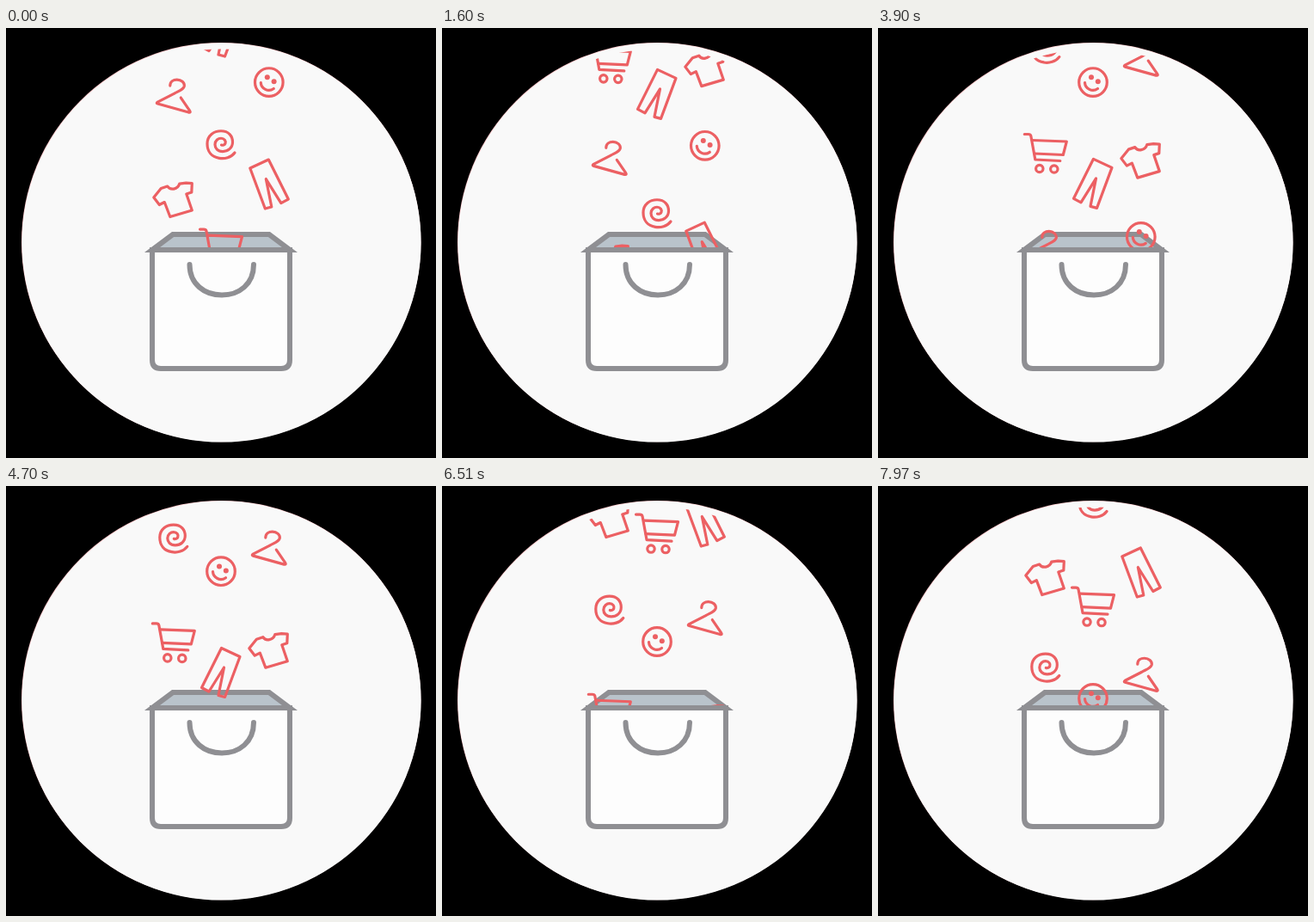
Animation of 500x500 px, one loop 8 s. Source, as an HTML page:

```html
<!DOCTYPE html>
<html lang="en">
<head>
<meta charset="utf-8">
<title>Shopping bag</title>
<style>
  html, body { margin: 0; width: 100%; height: 100%; overflow: hidden; background: #000; }
  svg { display: block; width: 100%; height: 100%; }
  .line { fill: none; stroke: #ec6063; stroke-width: 3.2; stroke-linecap: round; stroke-linejoin: round; }
  .dot { fill: #ec6063; stroke: none; }
  .bag { stroke: #8f8f93; stroke-width: 6; }
</style>
</head>
<body>
<svg viewBox="0 0 500 500">
  <defs>
    <clipPath id="opening">
      <path d="M25.5 255.5V249.5A225 225 0 0 1 475.5 249.5V255.5Z"/>
    </clipPath>
    <g id="smile">
      <circle r="16.3"/>
      <path d="M-9.5 .5C-9 7.5 -1 12 5.5 7.5"/>
      <circle class="dot" cx="-2" cy="-5.8" r="3"/>
      <circle class="dot" cx="5.8" cy="-.8" r="3"/>
    </g>
    <path id="spiral" d="M16 9.5C12 15 4 17 -2 15.8C-11 14.5 -16 8 -16 -1C-16 -11 -8 -15.8 0 -15.8C9 -15.8 13.5 -10 13.5 -3C13.5 4 8 8 2 8C-4 8 -7 4 -7 0C-7 -5 -3 -7.3 0 -7.3C4 -7.3 6 -4 5 -1.5C4.3 .3 2 1 .5 .5"/>
    <g id="hanger">
      <path d="M-4 -12C-4 -17 0 -19 4 -19C9 -19 13 -15.500 12.500 -11.500C11.500 -7 5 -5.500 1 -3L-18.500 7Q-20.500 8.500 -18.500 9L17.500 19Q20.500 19.500 18.800 17L8.500 2"/>
    </g>
    <path id="shirt" d="M-23 -3L-14.500 -13.500L-7 -16C-4 -11 5 -12 7 -19L14.500 -20L21.500 -19.500L21 -9L15 -7L21.500 12L-4 19.500L-10.500 2.500L-16.500 5.500Z"/>
    <path id="pants" d="M-22 -18.500L-.5 -28.500L22.500 17.500L14 22L-3.500 -6L3 26.500L-4.500 28.500Z"/>
    <g id="cart">
      <path d="M-24.500 -22H-20Q-17.500 -22 -17 -20L-12 7.500L17 9"/>
      <path d="M-15.500 -15L24.500 -13.500L20.500 2L-13 .5"/>
      <circle cx="-7" cy="18" r="4.200"/>
      <circle cx="10" cy="18.500" r="4.200"/>
    </g>
  </defs>

  <circle cx="250.200" cy="249.100" r="232.200" fill="#fbc9cc"/>
  <circle cx="250.600" cy="249.600" r="232" fill="#f9f9f9"/>
  <path class="bag" fill="#b9c3cb" d="M170 258L194 240H306L330 258Z"/>
  <g id="items" class="line" clip-path="url(#opening)"></g>
  <path class="bag" fill="#fdfdfd" d="M170 258H330V386Q330 396 320 396H180Q170 396 170 386Z"/>
  <path class="bag" fill="none" stroke-linecap="round" d="M213.500 275C213.500 298 231 310.500 251 310.500S288 298 288 275"/>
</svg>
<script>
const LOOP = 8000;
const LEFT = 194.8, MID = 250, RIGHT = 305.8;

// shape, column, y at time t0, t0 in ms, speed in px/ms, mirrored
const falls = [
  ['smile', RIGHT, 63, 0, .0461],
  ['hanger', LEFT, 79, 0, .0452],
  ['spiral', MID, 135.5, 0, .05],
  ['pants', RIGHT, 181.5, 0, .0457],
  ['shirt', LEFT, 200, 0, .0457],
  ['cart', MID, 256, 0, .058],
  ['pants', MID, 4.5, 0, .0452, true],
  ['cart', LEFT, 79, 2440, .0455],
  ['shirt', RIGHT, 87, 2440, .0463],
  ['smile', MID, 63, 3900, .0452],
  ['hanger', RIGHT, 108.5, 5510, .045],
  ['spiral', LEFT, 98, 5510, .0459],
  ['cart', MID, 55, 6510, .0582],
  ['pants', RIGHT, 41.5, 6510, .0404],
  ['shirt', LEFT, 40, 6510, .0459],
  ['spiral', MID, 20, 7970, .0575]
];

const group = document.getElementById('items');
const nodes = falls.map(([shape]) => {
  const use = document.createElementNS('http://www.w3.org/2000/svg', 'use');
  use.setAttribute('href', '#' + shape);
  return group.appendChild(use);
});

function draw(t) {
  falls.forEach(([, x, y, t0, speed, mirrored], i) => {
    const top = y + (t - t0) * speed;
    nodes[i].setAttribute('transform',
      `translate(${x} ${top.toFixed(2)})${mirrored ? ' scale(-1 1)' : ''}`);
  });
}

const start = performance.now();
function tick() {
  draw((performance.now() - start) % LOOP);
  requestAnimationFrame(tick);
}
tick();
</script>
</body>
</html>
```
